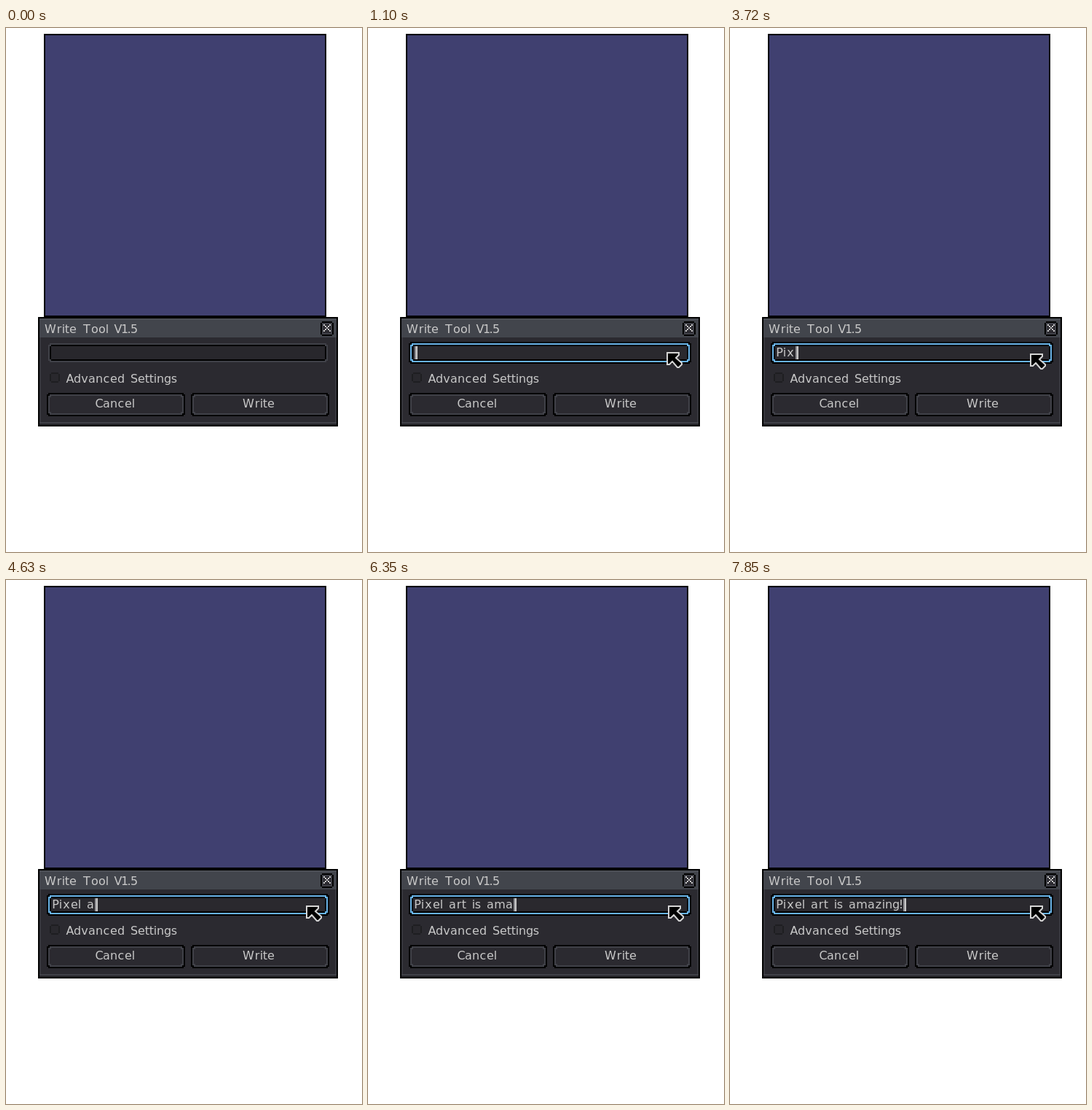
These frames come from a looping animation (489x718 px, 8 s). An HTML page with a canvas:

```html
<!DOCTYPE html>
<html lang="en">
<head>
<meta charset="utf-8">
<title>Write Tool</title>
<style>
  html, body { margin: 0; width: 100%; height: 100%; overflow: hidden; background: #fff; }
  canvas { display: block; }
</style>
</head>
<body>
<canvas id="stage" width="489" height="718"></canvas>
<script>
const ctx = document.getElementById('stage').getContext('2d');
const LOOP = 8000;
const BLACK = '#000', BODY = '#2b2a30', EDGE = '#404148', INK = '#c8c8c8', BLUE = '#69b4e8';
const MESSAGE = 'Pixel art is amazing!';
const KEY_TIMES = [2900, 3420, 3720, 3920, 4120, 4430, 4630, 4830, 5030, 5230, 5540,
  5640, 5840, 6050, 6250, 6350, 6850, 7050, 7150, 7450, 7850];
const CARET_TOGGLES = [1100, 1590, 2090, 2600, 2900];
const POINTER_PATH = [[600, 22, 2], [700, 12, 2], [800, 4, 0], [900, 0, 0], [1100, -2, -2], [1190, 0, 0]];
const PRESS = 1100, HOVER = 700;

// Left, top, right, bottom
function rect(x0, y0, x1, y1, color) {
  ctx.fillStyle = color;
  ctx.fillRect(x0, y0, x1 - x0, y1 - y0);
}

// Rectangle with its corner pixels cut off
function notched(x0, y0, x1, y1, color) {
  rect(x0 + 2, y0, x1 - 2, y1, color);
  rect(x0, y0 + 2, x1, y1 - 2, color);
}

// Cell width of a letter on the 2px grid
function advance(ch) {
  if ('il!.'.includes(ch)) return 4;
  if (ch === 't') return 6;
  if ('rs1 '.includes(ch)) return 8;
  if ('xT'.includes(ch)) return 12;
  return 'Wm'.includes(ch) ? 16 : 10;
}

// Draws the text and returns the x where the next letter would start
function write(text, x, baseline) {
  ctx.fillStyle = INK;
  for (const ch of text) {
    const width = advance(ch);
    ctx.fillText(ch, x + width / 2 - 1, baseline);
    x += width;
  }
  return x;
}

function button(label, x, textX) {
  notched(x, 500, x + 190, 532, BLACK);
  notched(x + 2, 502, x + 188, 530, EDGE);
  notched(x + 4, 504, x + 186, 528, BODY);
  write(label, textX, 520);
}

function closeButton() {
  notched(432, 402, 450, 422, BLACK);
  rect(434, 404, 448, 420, EDGE);
  rect(436, 406, 446, 418, BODY);
  for (let i = 0; i < 10; i += 2) {
    rect(436 + i, 406 + i, 438 + i, 408 + i, INK);
    rect(444 - i, 406 + i, 446 - i, 408 + i, INK);
  }
}

function panel() {
  rect(52, 8, 440, 398, BLACK);
  rect(54, 10, 438, 394, '#404070');
  rect(44, 396, 456, 546, BLACK);
  rect(46, 398, 454, 544, '#36363d');
  rect(48, 424, 452, 540, BODY);
  rect(46, 398, 454, 424, '#42454c');
  rect(46, 398, 454, 400, '#4d5057');
  rect(46, 540, 454, 542, EDGE);
  rect(46, 542, 454, 544, '#222227');
  write('Write Tool V1.5', 54, 418);
  closeButton();
  notched(60, 472, 74, 486, '#1e1e21');
  rect(62, 474, 72, 484, '#29282d');
  write('Advanced Settings', 84, 486);
  button('Cancel', 56, 124);
  button('Write', 254, 326);
}

function field(t) {
  const focused = t >= PRESS;
  if (focused) notched(56, 430, 444, 460, BLACK);
  notched(58, 432, 442, 458, focused ? BLUE : EDGE);
  notched(60, 434, 440, 456, BLACK);
  rect(62, 436, 438, 454, t >= HOVER ? '#2a292e' : '#28272c');

  const typed = KEY_TIMES.filter(k => k <= t).length;
  const x = write(MESSAGE.slice(0, typed), 64, 450);
  if (CARET_TOGGLES.filter(k => k <= t).length % 2) {
    rect(x, 436, x + 2, 454, '#909094');
    rect(x + 2, 436, x + 4, 454, INK);
  }
}

function pointer(t) {
  const step = POINTER_PATH.filter(p => p[0] <= t).pop();
  if (!step) return;
  ctx.save();
  ctx.translate(412 + step[1], 446 + step[2]);
  const arrow = new Path2D('M1 1H17V4L13 8L21 15V17L17 21H15L8 13L4 17H1Z');
  ctx.fillStyle = BLACK;
  ctx.fill(arrow);
  ctx.strokeStyle = '#d4d4d4';
  ctx.lineWidth = 2;
  ctx.stroke(arrow);
  ctx.restore();
}

function frame() {
  const t = performance.now() % LOOP;
  rect(0, 0, 489, 718, '#fff');
  ctx.font = '16px "DejaVu Sans", sans-serif';
  ctx.textAlign = 'center';
  panel();
  field(t);
  pointer(t);
  requestAnimationFrame(frame);
}
frame();
</script>
</body>
</html>
```
